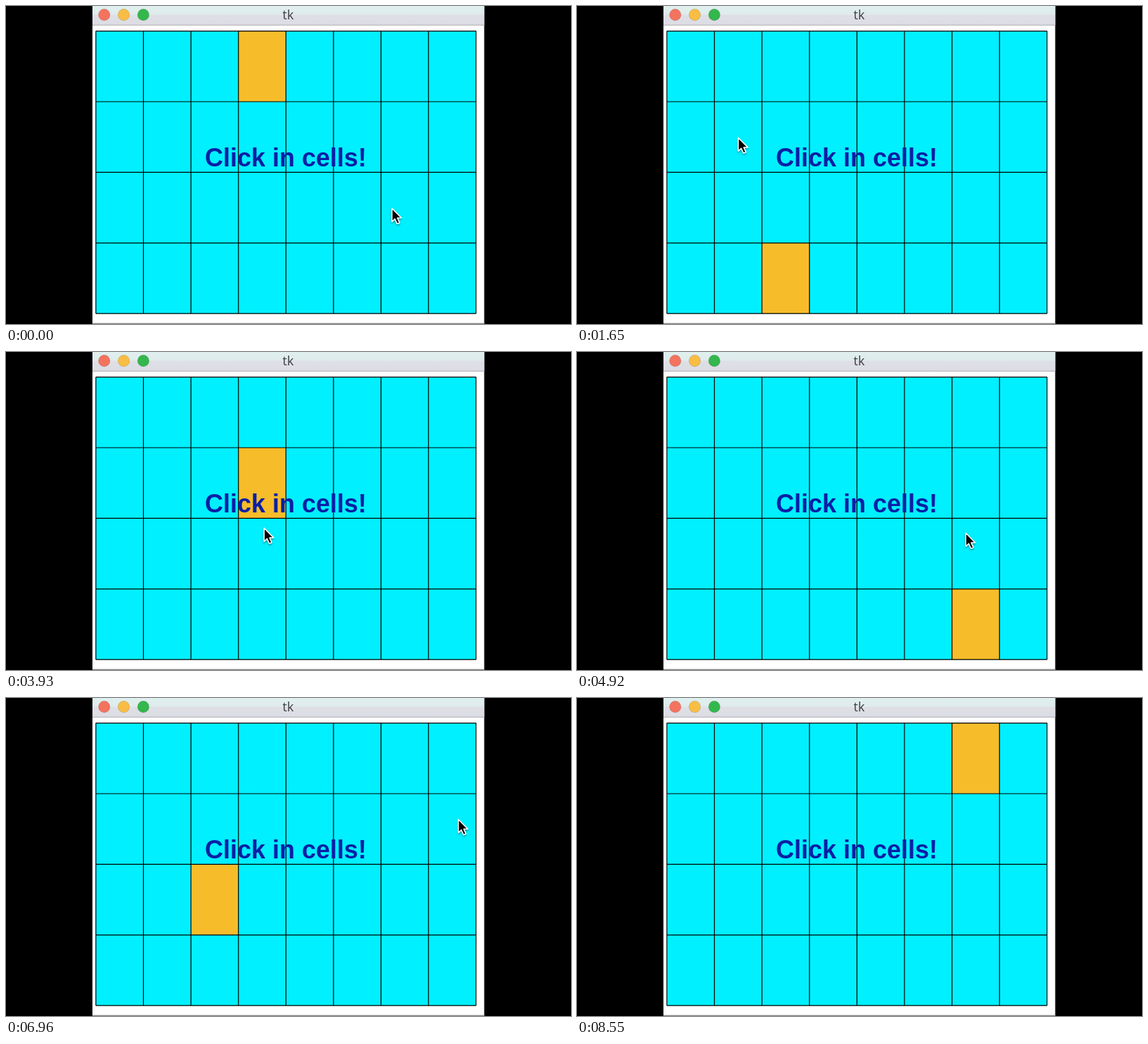
An HTML page that plays this animation: 804x452 px, repeating every 8610 ms.

```html
<!DOCTYPE html>
<html lang="en">
<head>
<meta charset="utf-8">
<title>Click in cells</title>
<style>
  html, body { margin: 0; width: 100%; height: 100%; overflow: hidden; background: #000; }
  svg { display: block; width: 804px; height: 452px; }
</style>
</head>
<body>
<svg viewBox="0 0 804 452">
  <defs>
    <linearGradient id="bar" x2="0" y2="1">
      <stop offset="0" stop-color="#dff0ee"/>
      <stop offset=".44" stop-color="#dfebec"/>
      <stop offset=".48" stop-color="#dfdfe6"/>
      <stop offset="1" stop-color="#dcdce4"/>
    </linearGradient>
    <clipPath id="window"><rect x="123" width="557.5" height="452"/></clipPath>
    <filter id="shadow" x="-50%" y="-50%" width="200%" height="200%">
      <feDropShadow dx="0" dy="1.5" stdDeviation="1.2" flood-opacity=".45"/>
    </filter>
  </defs>
  <rect width="804" height="452"/>
  <g clip-path="url(#window)">
    <rect x="123" width="558" height="452" fill="#fff"/>
    <rect x="123" width="558" height="27" fill="url(#bar)"/>
    <rect x="123" y="26.7" width="558" height="1" fill="#aaa9ad"/>
    <rect x="123" y="450.7" width="558" height="1.3" fill="#85858a"/>
    <g id="lights"></g>
    <text x="401.5" y="19" font-family="'Open Sans', sans-serif" font-size="18" fill="#3c3c40" text-anchor="middle">tk</text>
    <rect id="board" fill="#00f0ff"/>
    <rect id="cell" fill="#f6bc2a"/>
    <path id="grid" stroke="#000" stroke-width="1.2" fill="none"/>
    <text x="398" y="228" font-family="'Liberation Sans', Arial, sans-serif" font-weight="700" font-size="36" fill="#0a1fa5" text-anchor="middle">Click in cells!</text>
    <path id="cursor" d="M0 1V20L4.2 16L7.4 23L10.8 21.6L7.7 14.7H13.5Z" stroke="#fff" stroke-width="1.5" stroke-linejoin="round" filter="url(#shadow)"/>
  </g>
</svg>
<script>
const LOOP = 8610, BEAT = 900;
const COLS = 8, ROWS = 4;
const byId = id => document.getElementById(id);
const setAll = (el, attrs) => Object.entries(attrs).forEach(([k, v]) => el.setAttribute(k, v));

const colX = c => 127.9 + c * 67.62;
const rowY = r => 35.6 + r * 100.4;

// The pointer clicks one stop per beat; units are columns and rows of the grid
const firstCell = { col: 3, row: 0 };
const stops = [
  [6.23, 2.5], [2.43, 3.5], [1.5, 1.5], [0.5, -0.03], [3.4, 1.4], [6.85, 3.85],
  [4.3, 0.8], [2.5, 2.8], [8.3, 1.35], [6.5, 0.3], [6.8, -3]
].map(([col, row]) => ({ col, row }));

function drawWindow() {
  byId('lights').innerHTML = ['#f4735f', '#f8bd44', '#34b74c'].map((fill, i) =>
    `<circle cx="${139.8 + i * 27.8}" cy="12.5" r="8.2" fill="${fill}" stroke="#000" stroke-opacity=".12"/>`
  ).join('');
  let lines = '';
  for (let c = 0; c <= COLS; c++) lines += `M${colX(c)} ${rowY(0)}V${rowY(ROWS)}`;
  for (let r = 0; r <= ROWS; r++) lines += `M${colX(0)} ${rowY(r)}H${colX(COLS)}`;
  byId('grid').setAttribute('d', lines);
  placeBox(byId('board'), 0, 0, COLS, ROWS);
}

function placeBox(el, col, row, cols, rows) {
  const x = colX(col), y = rowY(row);
  setAll(el, { x, y, width: colX(col + cols) - x, height: rowY(row + rows) - y });
}

function ease(p, from, to) {
  const u = Math.min(1, Math.max(0, (p - from) / (to - from)));
  return u * u * (3 - 2 * u);
}

const mix = (a, b, u) => a + (b - a) * u;

function render(t) {
  const beat = Math.floor(t / BEAT), p = t / BEAT - beat;
  const here = stops[beat], next = stops[beat + 1];

  // Vertical motion leads; the pointer rests around each click
  const x = colX(mix(here.col, next.col, ease(p, 0.3, 0.85)));
  const y = rowY(mix(here.row, next.row, ease(p, 0.15, 0.75)));
  byId('cursor').setAttribute('transform', `translate(${x.toFixed(1)} ${y.toFixed(1)})`);

  // A click outside the grid clears the selection
  const chosen = beat ? here : firstCell;
  const col = Math.floor(chosen.col), row = Math.floor(chosen.row);
  const inside = col >= 0 && col < COLS && row >= 0 && row < ROWS;
  byId('cell').setAttribute('visibility', inside ? 'visible' : 'hidden');
  placeBox(byId('cell'), col, row, 1, 1);
}

drawWindow();
const start = performance.now();
function tick() {
  const elapsed = (performance.now() - start) % LOOP;
  render(Math.floor(elapsed / 30) * 30);
  requestAnimationFrame(tick);
}
tick();
</script>
</body>
</html>
```
